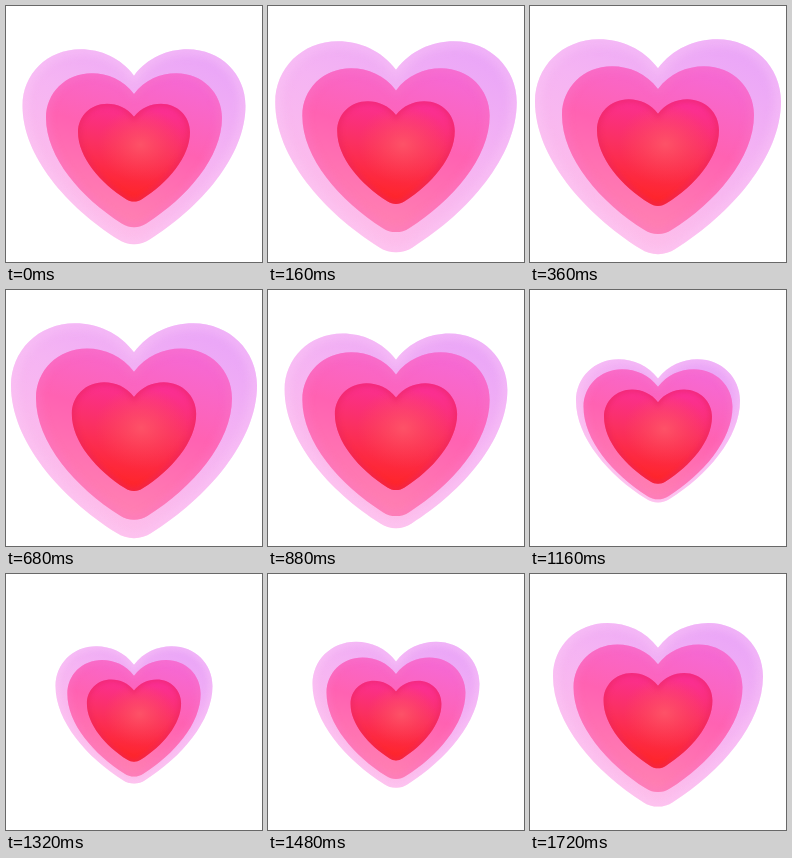
An HTML page that plays this animation: 256 by 256 pixels, repeating every 1760 ms.

```html
<!DOCTYPE html>
<html lang="en">
<head>
<meta charset="utf-8">
<title>Beating hearts</title>
<style>
  html, body { margin: 0; height: 100%; overflow: hidden; background: #fff; }
  svg { display: block; width: 100%; height: 100%; }
</style>
</head>
<body>
<svg viewBox="0 0 256 256">
  <defs>
    <!-- One heart, 100 units wide, centred on the origin -->
    <path id="heart" d="M0-32C-6-40-15-43.8-24-43.8C-39-43.8-50-32.5-50-18.5C-50 4-30 27-7 41.5
      C-3 44.3 3 44.3 7 41.5C30 27 50 4 50-18.5C50-32.5 39-43.8 24-43.8C15-43.8 6-40 0-32Z"/>
    <clipPath id="inside"><use href="#heart"/></clipPath>
    <filter id="soft" x="-20%" y="-20%" width="140%" height="140%" color-interpolation-filters="sRGB">
      <feGaussianBlur stdDeviation="2.2"/>
    </filter>

    <linearGradient id="lilac" x1=".85" y1="0" x2=".3" y2=".95">
      <stop offset="0" stop-color="#e9a4f8"/>
      <stop offset=".45" stop-color="#f5b4f3"/>
      <stop offset="1" stop-color="#ffbfe9"/>
    </linearGradient>
    <linearGradient id="pink" x1=".75" y1="0" x2=".4" y2="1">
      <stop offset="0" stop-color="#f569d6"/>
      <stop offset=".45" stop-color="#ff62b2"/>
      <stop offset="1" stop-color="#ff83b2"/>
    </linearGradient>
    <linearGradient id="red" x1=".6" y1="0" x2=".45" y2="1">
      <stop offset="0" stop-color="#fb2f98"/>
      <stop offset=".45" stop-color="#fa3062"/>
      <stop offset="1" stop-color="#ff2424"/>
    </linearGradient>
    <radialGradient id="glow" cx=".56" cy=".42" r=".38">
      <stop offset="0" stop-color="#ff6068" stop-opacity=".7"/>
      <stop offset="1" stop-color="#ff5050" stop-opacity="0"/>
    </radialGradient>
  </defs>

  <g id="outer">
    <use href="#heart" fill="url(#lilac)"/>
    <g clip-path="url(#inside)">
      <use href="#heart" fill="none" stroke="#fccbf8" stroke-width="4" opacity=".55" filter="url(#soft)"/>
    </g>
  </g>
  <g id="middle">
    <use href="#heart" fill="url(#pink)"/>
    <g clip-path="url(#inside)">
      <use href="#heart" fill="none" stroke="#fa78c8" stroke-width="4" opacity=".5" filter="url(#soft)"/>
    </g>
  </g>
  <g id="inner">
    <use href="#heart" fill="url(#red)"/>
    <use href="#heart" fill="url(#glow)"/>
    <g clip-path="url(#inside)">
      <use href="#heart" fill="none" stroke="#ea2460" stroke-width="5" opacity=".55" filter="url(#soft)"/>
    </g>
  </g>
</svg>
<script>
const LOOP = 1760, STEP = 40;

// keys: [time in ms, width in px]
const hearts = [
  { id: "outer", y: 141, keys: [[0, 223], [120, 240], [360, 246], [520, 248], [680, 246],
    [1000, 201], [1160, 164], [1320, 157], [1480, 167], [1680, 201], [1720, 210]] },
  { id: "middle", y: 144.4, keys: [[0, 176], [120, 186], [360, 192], [560, 197], [680, 196],
    [1000, 178], [1160, 149], [1340, 133], [1480, 139], [1720, 169]] },
  { id: "inner", y: 146.7, keys: [[0, 112], [360, 122], [640, 124.5], [1000, 120],
    [1160, 108], [1420, 90], [1480, 91], [1720, 109]] }
];

// Key at any index, continuing into neighbouring loops
function keyAt(keys, i) {
  const n = keys.length, turn = Math.floor(i / n);
  const [time, width] = keys[i - turn * n];
  return [time + turn * LOOP, width];
}

function slope(a, b) {
  return (b[1] - a[1]) / (b[0] - a[0]);
}

// Harmonic mean keeps the curve free of overshoot
function tangent(keys, i) {
  const here = keyAt(keys, i);
  const before = slope(keyAt(keys, i - 1), here);
  const after = slope(here, keyAt(keys, i + 1));
  return before * after > 0 ? 2 * before * after / (before + after) : 0;
}

function widthAt(keys, time) {
  const i = keys.filter(key => key[0] <= time).length - 1;
  const a = keyAt(keys, i), b = keyAt(keys, i + 1);
  const span = b[0] - a[0], u = (time - a[0]) / span, v = 1 - u;
  return a[1] * v * v * (1 + 2 * u) + b[1] * u * u * (3 - 2 * u)
    + span * u * v * (tangent(keys, i) * v - tangent(keys, i + 1) * u);
}

function draw() {
  const time = Math.floor(performance.now() % LOOP / STEP) * STEP;
  for (const { id, y, keys } of hearts) {
    const scale = widthAt(keys, time) / 100;
    document.getElementById(id).setAttribute("transform", `translate(128 ${y}) scale(${scale})`);
  }
  requestAnimationFrame(draw);
}
draw();
</script>
</body>
</html>
```
